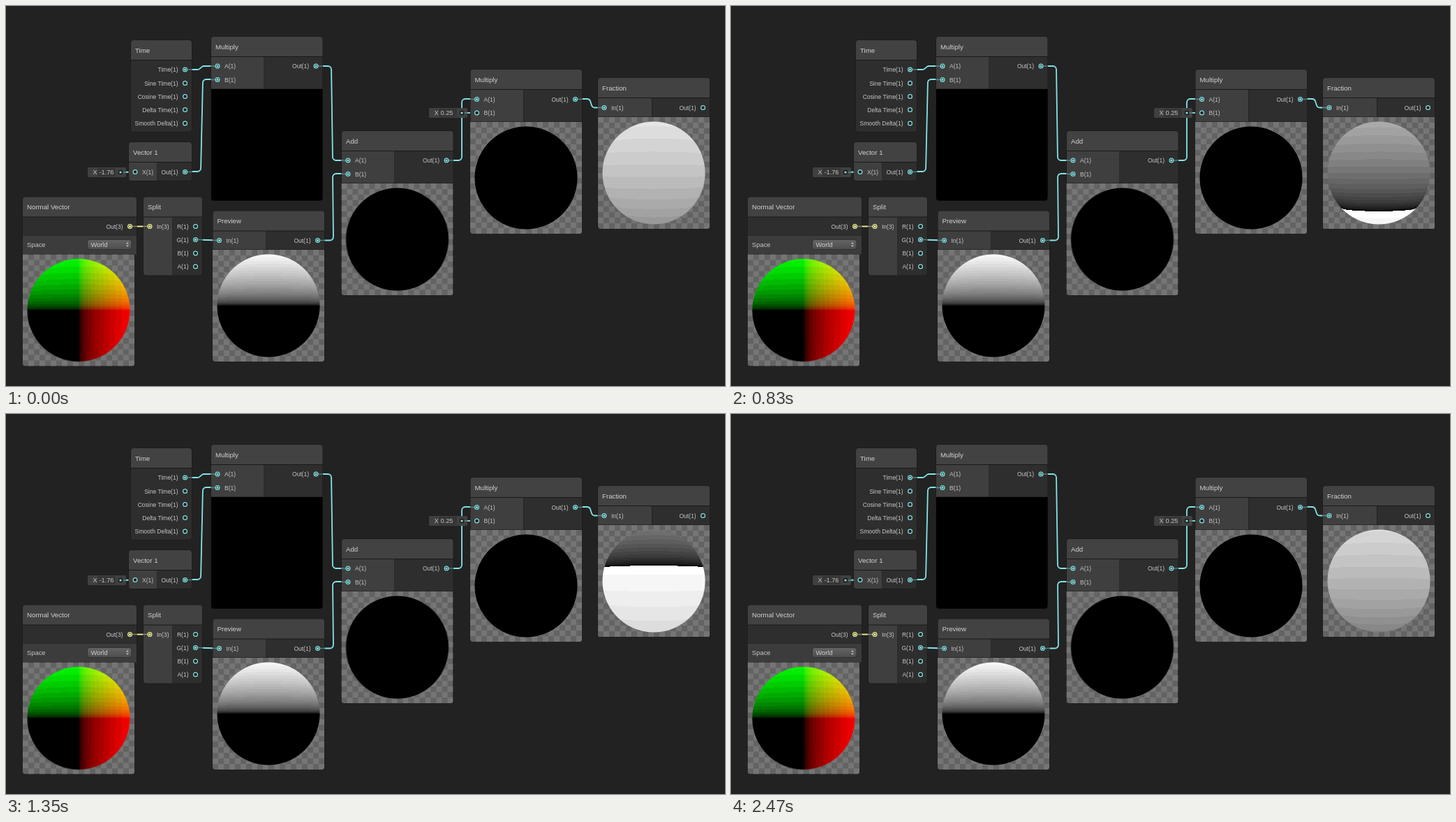
These frames come from a looping animation (1030 by 544 pixels, 2.57 s). An HTML page with a canvas:

```html
<!DOCTYPE html>
<html lang="en">
<head>
<meta charset="utf-8">
<title>Shader graph</title>
<style>
  html, body { margin: 0; width: 100%; height: 100%; overflow: hidden; background: #222; }
  canvas { display: block; }
</style>
</head>
<body>
<canvas id="stage" width="1030" height="544"></canvas>
<script>
const ctx = document.getElementById('stage').getContext('2d');
const LOOP = 2570, TICK = 87.6, FIRST_TICK = 32;
const SIZE = 160, RADIUS = 73.5, CAMERA = 8;
const CYAN = '#84e4e7', YELLOW = '#f4f59a';
const HEADER = '#424242', INPUT = '#3f3f3f', BODY = '#2e2e2e';

// ---------- sphere previews ----------

// Surface normals of a unit sphere seen in perspective, with edge coverage.
const normals = [];
for (let py = 0; py < SIZE; py++) {
  for (let px = 0; px < SIZE; px++) {
    let x = (px + 0.5 - SIZE / 2) / RADIUS, y = (SIZE / 2 - py - 0.5) / RADIUS;
    const r = Math.hypot(x, y);
    const alpha = Math.max(0, Math.min(1, (1 - r) * RADIUS + 0.5));
    if (r > 1) { x /= r; y /= r; }
    const reach = CAMERA * CAMERA - 1, scale = 1 / Math.sqrt(reach);
    const a = 1 + scale * scale * Math.min(1, r * r);
    const hit = (CAMERA - Math.sqrt(Math.max(0, CAMERA * CAMERA - a * reach))) / a;
    normals.push({ x: x * scale * hit, y: y * scale * hit, alpha });
  }
}

const buffer = document.createElement('canvas');
buffer.width = buffer.height = SIZE;
const bufferCtx = buffer.getContext('2d');
const image = bufferCtx.createImageData(SIZE, SIZE);

// Linear light to a banded sRGB level.
function level(v, step) {
  v = Math.max(0, Math.min(1, v));
  const encoded = v <= 0.0031308 ? 12.92 * v : 1.055 * v ** (1 / 2.4) - 0.055;
  return Math.round(encoded * 255 / step) * step;
}

const gray = v => { const g = level(v, 8.5); return [g, g, g]; };

function checker(x, y) {
  ctx.fillStyle = '#636363';
  ctx.fillRect(x, y, SIZE, SIZE);
  ctx.fillStyle = '#757575';
  for (let row = 0; row < 20; row++)
    for (let col = row % 2; col < 20; col += 2) ctx.fillRect(x + col * 8, y + row * 8, 8, 8);
}

function sphere(x, y, shade) {
  normals.forEach((n, i) => {
    if (!n.alpha) return;
    image.data.set([...shade(n), n.alpha * 255], i * 4);
  });
  bufferCtx.putImageData(image, 0, 0);
  ctx.save();
  ctx.beginPath();
  ctx.roundRect(x, y, SIZE, SIZE, [0, 0, 4, 4]);
  ctx.clip();
  checker(x, y);
  ctx.drawImage(buffer, x, y);
  ctx.restore();
}

// ---------- graph parts ----------

function text(str, x, y, size = 8.5, align = 'left', color = '#c6c6c6') {
  ctx.font = `${size}px "Liberation Sans", Arial, sans-serif`;
  ctx.textAlign = align;
  ctx.fillStyle = color;
  ctx.fillText(str, x, y + size * 0.36);
}

function box(x, y, w, h, color, radii = 0) {
  ctx.fillStyle = color;
  ctx.beginPath();
  ctx.roundRect(x, y, w, h, radii);
  ctx.fill();
}

function wire(points, color = CYAN) {
  ctx.strokeStyle = color;
  ctx.lineWidth = 1.8;
  ctx.beginPath();
  ctx.moveTo(...points[0]);
  for (let i = 1; i < points.length - 1; i++) ctx.arcTo(...points[i], ...points[i + 1], 5);
  ctx.lineTo(...points.at(-1));
  ctx.stroke();
}

function port(x, y, linkedTo, color = CYAN) {
  ctx.strokeStyle = color;
  if (linkedTo) {
    ctx.globalAlpha = 0.45;
    ctx.lineWidth = 1.4;
    ctx.beginPath();
    ctx.moveTo(x, y);
    ctx.lineTo(linkedTo, y);
    ctx.stroke();
    ctx.globalAlpha = 1;
  }
  ctx.lineWidth = 1.2;
  ctx.fillStyle = '#202020';
  ctx.beginPath();
  ctx.arc(x, y, 2.9, 0, 7);
  ctx.fill();
  ctx.stroke();
  if (linkedTo) dot(x, y, color);
}

function dot(x, y, color) {
  ctx.fillStyle = color;
  ctx.beginPath();
  ctx.arc(x, y, 1.6, 0, 7);
  ctx.fill();
}

// split: x of the border between inputs and outputs; portsEnd: bottom of the port rows.
function node({ title, x, y, w, h, split = x, portsEnd = y + h, ins = [], outs = [], color = CYAN }) {
  box(x - 0.5, y - 0.5, w + 1, h + 1, '#191919', 4.5);
  box(x, y, w, 28, HEADER, [4, 4, 0, 0]);
  const top = y + 29, tall = portsEnd - top, round = portsEnd === y + h ? 4 : 0;
  box(split, top, x + w - split, tall, BODY, [0, 0, round, split === x ? round : 0]);
  if (split > x) box(x, top, split - x - 0.5, tall, INPUT, [0, 0, 0, round]);
  text(title, x + 6, y + 14.5, 9.7, 'left', '#d2d2d2');
  for (const [label, py, linked, tint = color] of ins) {
    port(x + 9, py, linked && x, tint);
    text(label, x + 19, py);
  }
  for (const [label, py, linked, tint = color] of outs) {
    port(x + w - 9.5, py, linked && x + w, tint);
    text(label, x + w - 19.5, py, 8.5, 'right');
  }
}

function valueField(x, y, value) {
  box(x, y, 55, 14, '#404040', 2);
  box(x + 14, y + 1, 26, 12, '#363636', 2);
  text('X', x + 7.5, y + 7, 9.2);
  text(value, x + 16.5, y + 7, 9.2);
  ctx.strokeStyle = CYAN;
  ctx.globalAlpha = 0.45;
  ctx.lineWidth = 1.4;
  ctx.beginPath();
  ctx.moveTo(x + 47, y + 7);
  ctx.lineTo(x + 55, y + 7);
  ctx.stroke();
  ctx.globalAlpha = 1;
  box(x + 43.5, y + 3.5, 7, 7, '#222', 3.5);
  dot(x + 47, y + 7, CYAN);
}

function dropdown(x, y, w, h, label) {
  const fill = ctx.createLinearGradient(0, y, 0, y + h);
  fill.addColorStop(0, '#646464');
  fill.addColorStop(1, '#4e4e4e');
  box(x - 0.5, y - 0.5, w + 1, h + 1, '#292929', 3);
  box(x, y, w, h, fill, 3);
  text(label, x + 4.5, y + h / 2, 9.3, 'left', '#d0d0d0');
  ctx.fillStyle = '#bbb';
  for (const dir of [-1, 1]) {
    const base = y + h / 2 + dir;
    ctx.beginPath();
    ctx.moveTo(x + w - 7.5, base);
    ctx.lineTo(x + w - 3.5, base);
    ctx.lineTo(x + w - 5.5, base + dir * 2.5);
    ctx.fill();
  }
}

function drawGraph() {
  ctx.fillStyle = '#222';
  ctx.fillRect(0, 0, 1030, 544);

  wire([[256, 91], [276, 91], [282, 86], [303, 86]]);
  wire([[256, 237], [279, 237], [282, 105], [303, 105]]);
  wire([[444, 86], [466, 86], [468, 221], [490, 221]]);
  wire([[447, 335.5], [469, 335.5], [468, 240], [490, 240]]);
  wire([[631, 221], [653, 221], [653, 133], [674, 133]]);
  wire([[816, 133], [836, 133], [840, 145.5], [857, 145.5]]);
  wire([[271, 334.5], [306, 335.5]]);
  wire([[177, 315.5], [206, 315.5]], YELLOW);
  wire([[164, 238], [185, 237.5]]);
  wire([[653, 153], [674, 153]]);

  node({ title: 'Time', x: 179, y: 49, w: 87, h: 131, outs: [
    ['Time(1)', 91, true], ['Sine Time(1)', 110.5], ['Cosine Time(1)', 129.5],
    ['Delta Time(1)', 148.5], ['Smooth Delta(1)', 168]] });
  node({ title: 'Multiply', x: 294, y: 44, w: 159.5, h: 234.5, split: 370, portsEnd: 118.5,
    ins: [['A(1)', 86, true], ['B(1)', 105.5, true]], outs: [['Out(1)', 86, true]] });
  box(294, 119, 159.5, 159.5, '#000', [0, 0, 4, 4]);
  node({ title: 'Vector 1', x: 176, y: 195, w: 90, h: 55, split: 217,
    ins: [['X(1)', 237.5]], outs: [['Out(1)', 237.5, true]] });
  node({ title: 'Normal Vector', x: 24, y: 273.5, w: 163, h: 82, portsEnd: 328,
    outs: [['Out(3)', 315.5, true]], color: YELLOW });
  box(24, 328.5, 163, 27, '#3c3c3c');
  text('Space', 30, 341.5, 9.4);
  dropdown(117, 335, 62.5, 13, 'World');
  node({ title: 'Split', x: 197, y: 273.5, w: 84, h: 112, split: 239,
    ins: [['In(3)', 315.5, true, YELLOW]],
    outs: [['R(1)', 315.5], ['G(1)', 334.5, true], ['B(1)', 354], ['A(1)', 373]] });
  node({ title: 'Preview', x: 296.5, y: 293.5, w: 159.5, h: 215, split: 373, portsEnd: 348.5,
    ins: [['In(1)', 335.5, true]], outs: [['Out(1)', 335.5, true]] });
  node({ title: 'Add', x: 481, y: 179, w: 159.5, h: 234.5, split: 557, portsEnd: 253.5,
    ins: [['A(1)', 221, true], ['B(1)', 240.5, true]], outs: [['Out(1)', 221, true]] });
  node({ title: 'Multiply', x: 665.5, y: 91, w: 159.5, h: 234.5, split: 741.5, portsEnd: 165.5,
    ins: [['A(1)', 133.5, true], ['B(1)', 153]], outs: [['Out(1)', 133.5, true]] });
  node({ title: 'Fraction', x: 848, y: 103, w: 160, h: 216, split: 925.5, portsEnd: 158.5,
    ins: [['In(1)', 145.5, true]], outs: [['Out(1)', 145.5]] });
  valueField(117, 231, '-1.76');
  valueField(606, 146, '0.25');

  sphere(24, 355.5, n => [level(n.x, 17), level(n.y, 17), 0]);
  sphere(296, 349, n => gray(n.y));
  sphere(480.5, 254, () => [0, 0, 0]);
  sphere(665, 166, () => [0, 0, 0]);
}

// ---------- animation ----------

const fract = v => v - Math.floor(v);
let shownTick;

function frame(now) {
  const tick = Math.floor((now % LOOP - FIRST_TICK) / TICK);
  if (tick !== shownTick) {
    shownTick = tick;
    const seconds = Math.max(0, FIRST_TICK + tick * TICK) / 1000;
    sphere(848, 159, n => gray(fract(0.25 * (n.y + 2.16 - 1.8 * seconds))));
  }
  requestAnimationFrame(frame);
}

drawGraph();
frame(0);
</script>
</body>
</html>
```
